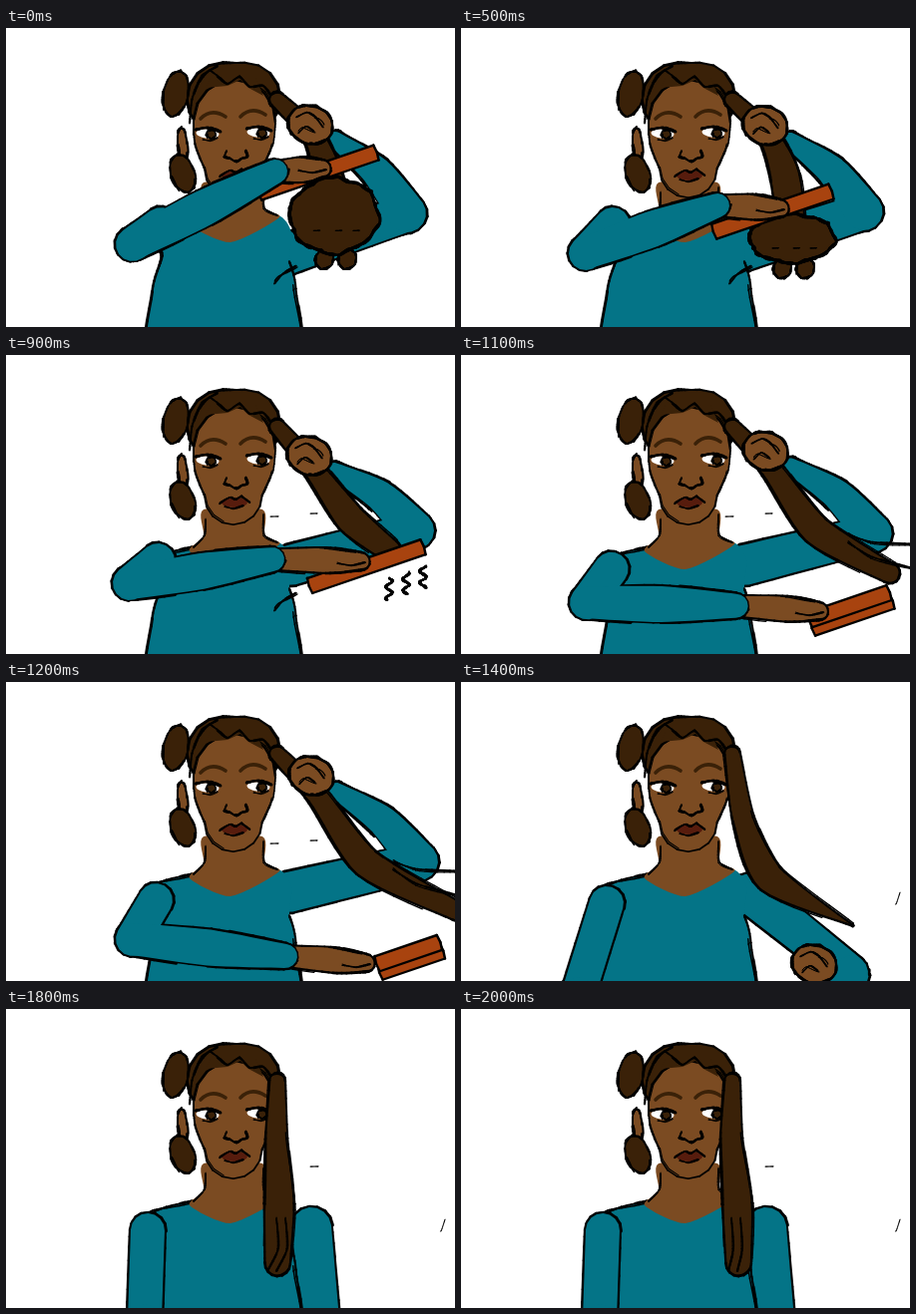
An HTML page with a canvas that plays this animation: 450 by 300 pixels, repeating every 2.1 s.

```html
<!DOCTYPE html>
<html lang="en">
<head>
<meta charset="utf-8">
<title>Straightening hair</title>
<style>
  html, body { margin: 0; width: 100%; height: 100%; overflow: hidden; background: #fff; }
  canvas { display: block; }
</style>
</head>
<body>
<canvas id="stage" width="450" height="300"></canvas>
<script>
const ctx = document.getElementById('stage').getContext('2d');
const TEAL = '#047487', SKIN = '#7b4b22', HAIR = '#3a2108', IRON = '#a8430f', LIP = '#571c0d';
const LOOP = 2100, STEP = 100, TILT = -.33;

// Joints of each pose; a joint left out glides on to its next mention.
// front: shoulder, elbow, wrist; rear: shoulder, elbow; iron: centre, half length;
// lock: two points along the strand, then its tip with a half width.
const poses = [
  { t: 400, front: [[155,197], [127,217], [270,144]], fingers: [[317,141]], iron: [[312,145,62]],
    rear: [[282,227], [402,186]], fist: [[305,97]], lock: [[308,108], [323,150], [329,188,14]] },
  { t: 500, front: [[152,197], [125,226], [257,178]], fingers: [[320,181]], iron: [[312,184,62]],
    lock: [[308,108], [325,150], [332,211,14]] },
  { t: 900, front: [[152,206], [124,229], [267,205]], fingers: [[356,207]], iron: [[361,212,60]],
    rear: [[285,211], [410,176]], fist: [[304,101]], lock: [[308,114], [345,164], [384,196,12]] },
  { t: 1200, front: [[150,219], [127,258], [280,275]], fingers: [[361,282]], iron: [[403,272,33]],
    rear: [[283,211], [414,180]], fist: [[306,94]], lock: [[312,114], [362,182], [452,230,10]] },
  { t: 1400, front: [[146,222], [118,312], [130,345]], fingers: [[170,345]], iron: [[385,350,45]],
    rear: [[290,212], [390,292]], fist: [[354,283]], lock: [[283,138], [310,197], [392,244,1]] },
  { t: 1600, front: [[142,222], [139,312], [139,345]],
    rear: [[306,219], [316,312]], fist: [[314,350]], lock: [[271,130], [277,195], [278,255,13]] }
];

const mix = (a, b, u) => a.map((v, i) => v + (b[i] - v) * u);
const shift = ([x, y], dx, dy) => [x + dx, y + dy];
const noise = i => { const s = Math.sin(i * 127.1) * 43758.5; return s - Math.floor(s); };

function joints(name, t) {
  const keys = poses.filter(p => name in p);
  const next = keys.find(p => p.t > t) || keys.at(-1);
  const last = keys.findLast(p => p.t <= t) || next;
  const u = next === last ? 0 : (t - last.t) / (next.t - last.t);
  return last[name].map((p, i) => mix(p, next[name][i], u));
}

// Smooth spline through points of any dimension.
function curve(points, closed) {
  const n = points.length, out = [];
  const point = i => points[closed ? (i + n) % n : Math.max(0, Math.min(n - 1, i))];
  for (let i = 0; i < (closed ? n : n - 1); i++) {
    const [p, a, b, q] = [-1, 0, 1, 2].map(d => point(i + d));
    for (let s = 0; s <= 1; s += 1 / 8) {
      const s2 = s * s, s3 = s2 * s;
      out.push(a.map((v, k) => v * (2 * s3 - 3 * s2 + 1) + b[k] * (3 * s2 - 2 * s3)
        + .36 * ((b[k] - p[k]) * (s3 - 2 * s2 + s) + (q[k] - v) * (s3 - s2))));
    }
  }
  return out;
}

// Outline of a rounded limb along a spine of [x, y, radius].
function limb(...spine) {
  const mid = curve(spine), left = [], right = [];
  const angle = i => {
    const a = mid[Math.max(0, i - 1)], b = mid[Math.min(mid.length - 1, i + 1)];
    return Math.atan2(b[1] - a[1], b[0] - a[0]);
  };
  const rim = (i, turn) => {
    const [x, y, r] = mid[i], a = angle(i) + turn;
    return [x + r * Math.cos(a), y + r * Math.sin(a)];
  };
  mid.forEach((_, i) => {
    left.push(rim(i, -Math.PI / 2));
    right.unshift(rim(i, Math.PI / 2));
  });
  const cap = (i, from) => Array.from({ length: 9 }, (_, k) => rim(i, from + k * Math.PI / 8));
  return [...left, ...cap(mid.length - 1, -Math.PI / 2), ...right, ...cap(0, Math.PI / 2)];
}

function oval(x, y, rx, ry, turn = 0, bumps = 0) {
  const n = bumps || 12;
  return curve(Array.from({ length: n }, (_, i) => {
    const a = i / n * 2 * Math.PI, k = bumps ? .94 + .12 * noise(i + 3) : 1;
    const u = rx * k * Math.cos(a), v = ry * k * Math.sin(a);
    return [x + u * Math.cos(turn) - v * Math.sin(turn), y + u * Math.sin(turn) + v * Math.cos(turn)];
  }), true);
}

function fill(points, colour) {
  ctx.fillStyle = colour;
  ctx.beginPath();
  points.forEach(p => ctx.lineTo(...p));
  ctx.fill();
}

// Uneven pen line with a broken second stroke beside it.
function ink(points, width = 2, rough = 1) {
  ctx.strokeStyle = '#000';
  for (let pass = 0; pass < 2; pass++) {
    const spread = rough * (pass ? 1.8 : .5);
    const wobble = (p, i) => p.map((v, axis) => v + spread * Math.sin(i * .23 + axis * 2 + pass * 3));
    for (let i = 1; i < points.length; i++) {
      if (pass && noise((i >> 3) + points.length) < .45) continue;
      ctx.lineWidth = width * (pass ? .6 : .75 + .5 * noise((i >> 2) + 7));
      ctx.beginPath();
      ctx.moveTo(...wobble(points[i - 1], i - 1));
      ctx.lineTo(...wobble(points[i], i));
      ctx.stroke();
    }
  }
}

const line = (points, width, rough = .5) => ink(curve(points), width, rough);

// Joined parts: outlines first, so that the fills hide the inner seams.
function join(colour, ...parts) {
  parts.forEach(p => ink(p, 4));
  parts.forEach(p => fill(p, colour));
}

function shape(outline, colour, width = 2) {
  fill(outline, colour);
  ink(outline, width, .7);
}

function body() {
  const torso = [[284,234], [290,262], [290,345], [146,345], [146,265], [156,228], [143,207],
    [160,199], [188,193], [225,196], [272,188], [286,205]];
  fill(curve(torso, true), TEAL);
  ink(curve(torso.slice(0, 9)), 2.4);
  fill(curve([[198,155], [198,182], [184,197], [225,215], [274,190], [259,182], [257,155]], true), SKIN);
  line([[200,165], [199,181], [188,193]], 1.6);
  line([[258,160], [259,181], [272,188]], 1.6);
}

function eye(x, y) {
  fill(oval(x, y, 11.5, 4.6, .08), '#fff');
  shape(oval(x + 3.5, y + .5, 4.8, 4.2), HAIR, 1.4);
  line([[x - 12, y - 4], [x, y - 6], [x + 13, y - 2]], 2.6);
  line([[x - 5, y + 6], [x + 3, y + 7], [x + 10, y + 4]], 1);
}

function brow(x, y) {
  ctx.lineWidth = 3.6;
  ctx.strokeStyle = HAIR;
  ctx.beginPath();
  ctx.moveTo(x - 13, y + 3);
  ctx.quadraticCurveTo(x - 2, y - 8, x + 12, y + 1);
  ctx.stroke();
}

function head() {
  shape(oval(177, 117, 5, 17, -.1), SKIN);
  shape(limb([217,71,36], [239,71,36]), HAIR, 2.4);
  shape(limb([229,93,41], [228,117,39], [228,141,29]), SKIN, 1.8);
  fill([[200,60], [205,50], [250,50], [258,68], [243,60], [235,52], [222,58]], HAIR);
  line([[204,42], [213,49], [222,56], [234,49], [244,59], [258,58], [268,72]], 1.8);
  line([[184,95], [186,72], [197,48], [212,38]], 2.2, 1);
  shape(oval(170, 66, 12.5, 23, .2), HAIR);
  shape(oval(177, 146, 12, 19.5, -.33), HAIR);

  brow(208, 88);
  brow(248, 86);
  eye(202, 106);
  eye(253, 105);
  line([[221,123], [219,129], [225,131], [231,134], [236,131], [242,129], [240,123]], 1.9);
  fill(oval(229, 148, 13, 5), LIP);
  line([[214,149], [224,143], [230,145], [236,142], [244,148]], 1.8);
  line([[219,152], [228,154], [238,151]], 1.4);
}

function rearArm(t, [fx, fy]) {
  const [shoulder, elbow] = joints('rear', t), wrist = [fx + 25, fy + 15];
  const [mx, my] = mix(elbow, wrist, .5);
  join(TEAL, limb([...shoulder, 20], [...elbow, 18]),
    limb([...elbow, 19], [mx + 5, my - 5, 15], [...wrist, 8]));
}

function strand(t) {
  const [a, b, [x, y, r]] = joints('lock', t), u = (t - 1600) / 400;
  const sway = u > 0 && u < 1 ? 12 * Math.sin(u * 3 * Math.PI) * (1 - u) : 0;
  const tip = [x + sway, y, r];
  shape(limb([272,72,8], [...a, 11], [b[0] + sway / 2, b[1], 15], tip), HAIR, 2.2);
  if (t >= 1500) {
    for (const d of [-7, 2]) line([[x + d, y - 45], [x + d + 2, y - 15], [x + sway + d - 3, y + 8]], 1.8);
  }
  return tip;
}

// The curly end flattens as the iron pulls it straight.
function puff([x, y], t) {
  const u = Math.max(0, (t - 400) / 500);
  if (u >= 1) return;
  const rx = 44 * (1 - u * u), ry = 38 * (1 - u) ** 2;
  for (const d of [-10, 13]) shape(oval(x + d, y + ry + 6, 9, 10, .4), HAIR);
  shape(oval(x, y, rx, ry, 0, 30), HAIR, 3);
  for (const d of [-.4, .1, .5]) line([[x + d * rx - 3, y + ry * .4], [x + d * rx + 3, y + ry * .4]], 1.4);
}

function fist([x, y]) {
  shape(oval(x, y, 23, 19, .3), SKIN, 2.6);
  line([[x - 14, y - 8], [x - 4, y - 12], [x + 6, y - 7], [x + 13, y + 2]], 1.8, 1);
  line([[x - 12, y + 8], [x - 5, y + 2], [x + 4, y + 7]], 1.6, 1);
}

function iron(t) {
  const [[x, y, half]] = joints('iron', t);
  if (t >= 800 && t <= 1000) {
    for (let k = 0; k < 3; k++) {
      const curl = Array.from({ length: 12 }, (_, i) =>
        [x + 23 + 17 * k + 3.5 * Math.sin(i * 1.1 + k), y + 12 - 6 * k + 2 * i]);
      line(curl, 2.4);
    }
  }
  ctx.save();
  ctx.translate(x, y);
  ctx.rotate(TILT);
  const plate = drop => shape([[-half, drop - 8], [half, drop - 8], [half + 1, drop],
    [half, drop + 8], [-half, drop + 8], [-half - 1, drop], [-half, drop - 8]], IRON, 2.6);
  if (t >= 1100) plate(9);
  plate(0);
  ctx.restore();
}

function frontArm(t) {
  const [shoulder, elbow, wrist] = joints('front', t), [tip] = joints('fingers', t);
  shape(limb([...wrist, 11], [...mix(wrist, tip, .6), 13], [...tip, 9]), SKIN, 2.2);
  line([shift(tip, -24, 2), shift(tip, -10, 4), shift(tip, 4, 1)], 1.5);
  join(TEAL, limb([...shoulder, 17], [...elbow, 17]),
    limb([...elbow, 16], [...mix(elbow, wrist, .5), 18], [...wrist, 12]));
}

// Stray pen marks on the paper.
function flecks(t) {
  const dash = (x, y, dx, dy) => line([[x, y], [x + dx, y + dy]], 1, .3);
  if (t < 1100) line([[269,256], [277,247], [291,239]], 2, 1);
  if (t >= 800 && t <= 1200) {
    dash(265, 162, 8, 0);
    dash(305, 159, 7, 0);
  }
  if (t >= 1100 && t <= 1200) {
    for (const d of [0, 24]) line([[388,180 + d / 3], [412,188 + d / 1.6], [452,190 + d]], 2, .8);
  }
  if (t >= 1400) dash(440, 211, -4, 12);
  if (t >= 1500) dash(305, 158, 8, 0);
}

function draw(t) {
  ctx.fillStyle = '#fff';
  ctx.fillRect(0, 0, 450, 300);
  ctx.lineCap = ctx.lineJoin = 'round';
  const [hand] = joints('fist', t);
  rearArm(t, hand);
  body();
  head();
  const tip = strand(t);
  fist(hand);
  puff(tip, t);
  iron(t);
  frontArm(t);
  flecks(t);
}

function tick() {
  draw(Math.floor(performance.now() % LOOP / STEP) * STEP);
  requestAnimationFrame(tick);
}
tick();
</script>
</body>
</html>
```
